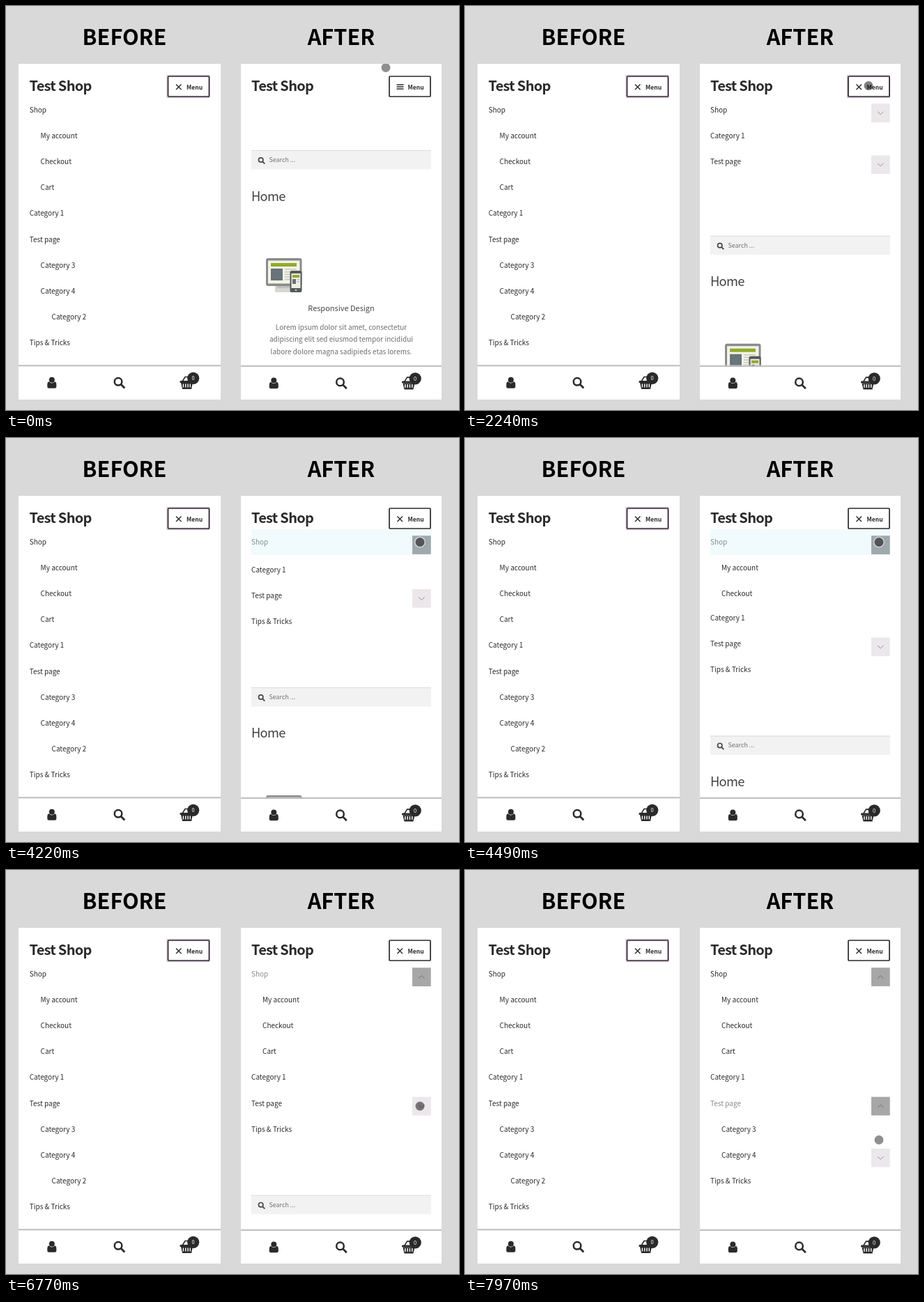
Animation, 650 px wide and 580 px high, one loop 8 s. Source, as an HTML page with a canvas:

```html
<!DOCTYPE html>
<html lang="en">
<head>
<meta charset="utf-8">
<title>Menu before and after</title>
<style>
  html, body { margin: 0; width: 100%; height: 100%; overflow: hidden; background: #d9d9d9; }
  canvas { display: block; }
</style>
</head>
<body>
<canvas id="stage" width="650" height="580"></canvas>
<script>
const ctx = document.getElementById('stage').getContext('2d');
const FONT = '"Noto Sans CJK JP", "Noto Sans CJK SC", "Open Sans", sans-serif';
const LOOP = 8000, ROW = 37.1, INK = '#2a2a2a';
const MENU_AT = 1820, SHOP_AT = 4190, PAGE_AT = 6840, SLIDE = 800;

// Pointer path: time, x, y
const PATH = [
  [200, 545, 88.5], [1000, 570, 103], [1640, 578.7, 112.5], [1790, 579, 114.5],
  [3230, 579, 114.5], [3450, 587, 133], [3680, 594, 149.5], [5180, 594, 149.5],
  [5300, 595, 160], [5420, 596, 181.5], [5980, 597, 283], [6200, 596, 318],
  [6560, 594, 339], [7580, 594, 339], [7780, 594, 358], [7970, 594, 387.5]
];

const clamp = v => Math.max(0, Math.min(1, v));

// CSS "ease": cubic-bezier(.25, .1, .25, 1)
function ease(p) {
  if (p <= 0 || p >= 1) return clamp(p);
  let lo = 0, hi = 1, u = 0.5;
  for (let i = 0; i < 20; i++) {
    u = (lo + hi) / 2;
    const x = 0.75 * u * (1 - u) + u ** 3;
    if (x < p) lo = u; else hi = u;
  }
  return 0.3 * u * (1 - u) ** 2 + 3 * u * u * (1 - u) + u ** 3;
}

const slide = (t, start) => ease((t - start) / SLIDE);

function pointerAt(t) {
  const i = PATH.findIndex(p => p[0] > t);
  if (i === 0) return PATH[0].slice(1);
  if (i < 0) return PATH[PATH.length - 1].slice(1);
  const [t0, x0, y0] = PATH[i - 1], [t1, x1, y1] = PATH[i];
  const k = (t - t0) / (t1 - t0);
  return [x0 + (x1 - x0) * k, y0 + (y1 - y0) * k];
}

function text(str, x, y, { size = 10, weight = 400, color = INK, spacing = 0, align = 'left' } = {}) {
  ctx.font = `${weight} ${size}px ${FONT}`;
  ctx.letterSpacing = spacing + 'px';
  ctx.textAlign = align;
  ctx.fillStyle = color;
  ctx.fillText(str, x, y);
}

function box(x, y, w, h, color, radius = 0) {
  ctx.fillStyle = color;
  ctx.beginPath();
  ctx.roundRect(x, y, w, h, radius);
  ctx.fill();
}

function line(points, color, width) {
  ctx.strokeStyle = color;
  ctx.lineWidth = width;
  ctx.beginPath();
  points.forEach(([x, y]) => ctx.lineTo(x, y));
  ctx.stroke();
}

function disc(x, y, r, color) {
  ctx.fillStyle = color;
  ctx.beginPath();
  ctx.arc(x, y, r, 0, 7);
  ctx.fill();
}

function clipped(x, y, w, h, draw) {
  if (h <= 0) return;
  ctx.save();
  ctx.beginPath();
  ctx.rect(x, y, w, h);
  ctx.clip();
  draw();
  ctx.restore();
}

function magnifier(x, y, r, width, color) {
  ctx.strokeStyle = color;
  ctx.lineWidth = width;
  ctx.beginPath();
  ctx.arc(x, y, r, 0, 7);
  ctx.stroke();
  line([[x + r * 0.75, y + r * 0.75], [x + r * 1.75, y + r * 1.75]], color, width * 1.1);
}

function header(x, buttonX, open, focused) {
  text('Test Shop', x, 122, { size: 20, weight: 700, spacing: -0.7 });
  ctx.lineWidth = 1;
  if (focused) {
    ctx.strokeStyle = '#cbb9cb';
    ctx.strokeRect(buttonX - 0.5, 99.5, 61, 32);
  }
  ctx.lineWidth = 1.7;
  ctx.strokeStyle = focused ? '#2c222d' : INK;
  ctx.beginPath();
  ctx.roundRect(buttonX + 1, 101, 59, 29, 1);
  ctx.stroke();
  const ix = buttonX + 12.5;
  if (open) {
    line([[ix, 112.5], [ix + 7.5, 120]], INK, 1.4);
    line([[ix, 120], [ix + 7.5, 112.5]], INK, 1.4);
  } else {
    for (const y of [113, 116, 119]) line([[ix - 1, y], [ix + 9, y]], INK, 1.5);
  }
  text('Menu', buttonX + 27.5, 119.8, { size: 8.5, weight: 600 });
}

function bottomBar(x, y, w) {
  box(x, y - 1, w, 1, '#d4d4d4');
  box(x, y, w, 1.5, '#b8b8b8');
  box(x, y + 1.5, w, 565 - y - 1.5, '#fff');
  ctx.save();
  ctx.translate(x, y - 516);
  // account
  box(41.3, 539, 13, 9.7, INK, [4, 4, 2.5, 2.5]);
  disc(47.8, 536.8, 4.7, '#fff');
  disc(47.8, 536.8, 4, INK);
  magnifier(143, 539.3, 5.3, 2.5, INK);
  // basket
  line([[235, 539], [239, 532.5], [246, 532.5], [249, 539]], INK, 1.6);
  box(231.5, 538, 20, 3, INK, 1);
  ctx.fillStyle = INK;
  ctx.beginPath();
  for (const [px, py] of [[233, 541], [250, 541], [248, 550], [235, 550]]) ctx.lineTo(px, py);
  ctx.fill();
  for (let i = 0; i < 4; i++) box(235.7 + i * 3.3, 542.5, 1.4, 5, '#fff');
  disc(250.7, 534.3, 8.6, INK);
  text('0', 250.7, 537, { size: 7.5, color: '#fff', align: 'center' });
  ctx.restore();
}

function devices(x, y) {
  ctx.save();
  ctx.translate(x, y);
  box(13, 39, 25, 10, '#d6d7d2', 1);
  box(16, 39, 19, 4, '#bfc0bc');
  box(0, 0, 51.5, 40, '#8a8b8b', 3);
  box(3, 3.5, 45.5, 33, '#f3f3e8');
  box(7, 7, 37, 5, '#8fab2c');
  box(7, 15, 17, 17, '#68737a');
  for (let i = 0; i < 5; i++) box(27, 15.5 + i * 3.6, 17, 1.4, '#c3c4ba');
  box(34.5, 18, 17, 31, '#55585a', 2.5);
  box(36.5, 22, 13, 21, '#eeeee4');
  box(38, 24, 10, 4, '#8fab2c');
  box(38, 30, 5, 7, '#68737a');
  box(44.5, 30, 3.5, 1.3, '#b5b6ae');
  box(44.5, 33, 3.5, 1.3, '#b5b6ae');
  disc(43, 46, 1.3, '#c9c9c9');
  ctx.restore();
}

function page(top) {
  box(352, top, 258, 27.5, '#f2f2f2');
  box(352, top, 258, 1, '#dcdcdc');
  magnifier(365.7, top + 14, 3.2, 1.7, '#484848');
  text('Search ...', 377.5, top + 16.8, { size: 8.9, color: '#707070' });
  text('Home', 352, top + 72.5, { size: 18.3, weight: 300, color: '#404040', spacing: -0.7 });
  devices(373, top + 155);
  text('Responsive Design', 481, top + 230.5, { size: 11, weight: 300, color: '#484848', align: 'center' });
  ['Lorem ipsum dolor sit amet, consectetur',
   'adipiscing elit sed eiusmod tempor incididui',
   'labore dolore magna sadipieds etas lorems.'].forEach((row, i) =>
    text(row, 481, top + 257.5 + i * 17.6, { color: '#6d6d6d', align: 'center' }));
}

function toggle(baseline, open) {
  const y = baseline - 12.8, d = open ? -2 : 2;
  box(583, y, 26.7, 26.7, open ? '#a7a7a8' : '#ebe7ea');
  line([[592, y + 13.5 - d], [596.3, y + 13.5 + d], [600.6, y + 13.5 - d]], open ? '#6f6f7c' : '#93909f', 1);
}

function tapGlow(y, t, start) {
  if (t < start) return;
  ctx.globalAlpha = clamp((start + 480 - t) / 180);
  box(352, y, 258, ROW, 'rgba(60,190,240,.07)');
  ctx.globalAlpha = 1;
}

function menu(t, shop, tests) {
  const first = 153, category = first + ROW + shop, tested = category + ROW;
  const shopOpen = t >= SHOP_AT, testOpen = t >= PAGE_AT;
  text('Shop', 352, first, { color: shopOpen && !testOpen ? '#8a8a8a' : INK });
  toggle(first, shopOpen);
  clipped(352, 168, 258, shop, () =>
    ['My account', 'Checkout', 'Cart'].forEach((s, i) => text(s, 368, first + ROW * (i + 1))));
  text('Category 1', 352, category);
  text('Test page', 352, tested, { color: testOpen ? '#8a8a8a' : INK });
  toggle(tested, testOpen);
  clipped(352, tested + 15, 258, tests, () => {
    text('Category 3', 368, tested + ROW);
    text('Category 4', 368, tested + ROW * 2);
    toggle(tested + ROW * 2, false);
  });
  text('Tips & Tricks', 352, tested + ROW + tests);
  tapGlow(131, t, SHOP_AT);
  tapGlow(tested - 22, t, PAGE_AT);
}

function pointer(t) {
  const [x, y] = pointerAt(t);
  const tapping = (t > 3890 && t < 4670) || (t > 6890 && t < 7320);
  const resting = (t > MENU_AT && t < 3300) || (t > 6740 && t < 7580);
  if (tapping) disc(x, y, 8, 'rgba(255,255,255,.5)');
  disc(x, y, 6.5, `rgba(0,0,0,${tapping ? 0.6 : resting ? 0.5 : 0.44})`);
}

function before() {
  box(18, 83, 290, 482, '#fff');
  header(33.5, 231.5, true, true);
  [['Shop', 0], ['My account', 1], ['Checkout', 1], ['Cart', 1], ['Category 1', 0], ['Test page', 0],
   ['Category 3', 1], ['Category 4', 1], ['Category 2', 2], ['Tips & Tricks', 0]].forEach(([s, level], i) =>
    text(s, 33.7 + level * 15.9, 153 + i * ROW));
  bottomBar(18, 516, 290);
}

function after(t) {
  const open = slide(t, MENU_AT) * ROW * 4;
  const shop = slide(t, SHOP_AT) * ROW * 3;
  const tests = slide(t, PAGE_AT) * ROW * 2;
  clipped(337, 83, 288, 482, () => {
    box(337, 83, 288, 482, '#fff');
    page(207 + open + shop + tests);
    clipped(352, 131, 258, open + shop + tests, () => menu(t, shop, tests));
    header(352, 549, t >= MENU_AT, t >= MENU_AT && t < 3900);
    bottomBar(336.5, 516.6, 288.5);
    pointer(t);
  });
}

function frame(now) {
  box(0, 0, 650, 580, '#d9d9d9');
  const title = { size: 30.7, weight: 700, color: '#000', align: 'center' };
  text('BEFORE', 170, 56, title);
  text('AFTER', 481, 56, title);
  before();
  after(now % LOOP);
  requestAnimationFrame(frame);
}
requestAnimationFrame(frame);
</script>
</body>
</html>
```
